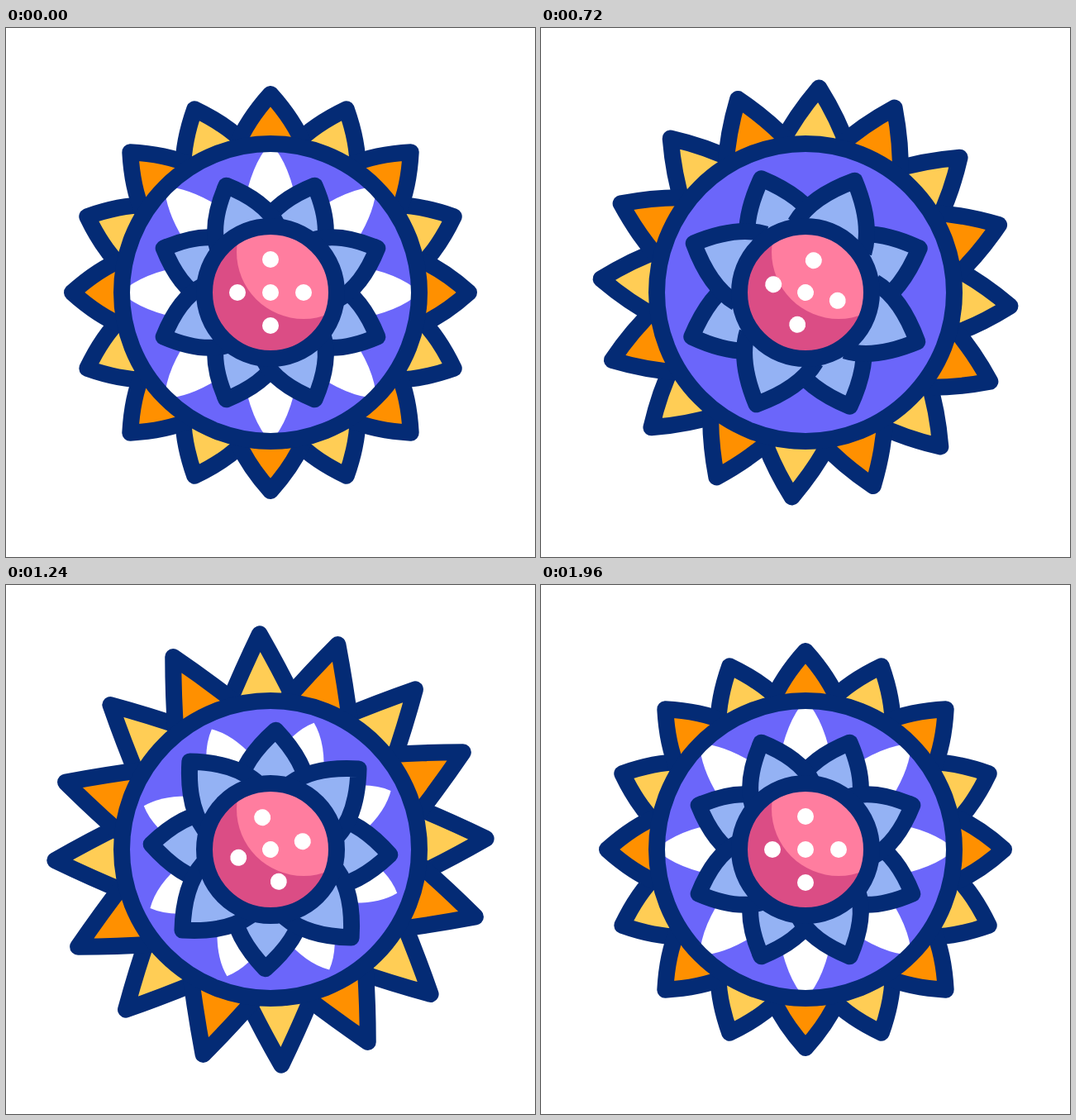
Recreate the animation shown at these times as an HTML page. Size 640 by 640 pixels, loop 2000 ms.

```html
<!DOCTYPE html>
<html lang="en">
<head>
<meta charset="utf-8">
<title>Mandala flower</title>
<style>
  html, body { margin: 0; width: 100%; height: 100%; overflow: hidden; background: #fff; }
  svg { display: block; width: 100%; height: 100%; }
  .line { stroke: #042b75; stroke-width: 20; stroke-linejoin: round; }
</style>
</head>
<body>
<svg viewBox="0 0 640 640">
  <defs>
    <clipPath id="core"><circle r="75"/></clipPath>
  </defs>
  <g transform="translate(320 320)">
    <g id="outer"></g>
    <circle r="180" fill="#6b66fa"/>
    <g id="white"></g>
    <circle class="line" r="180" fill="none"/>
    <g id="blue"></g>
    <circle r="75" fill="#db4d85"/>
    <circle cx="40" cy="-49" r="81" fill="#ff7d9f" clip-path="url(#core)"/>
    <circle class="line" r="80" fill="none"/>
    <g id="dots" fill="#fff"></g>
  </g>
</svg>
<script>
const LOOP = 2000, STEP = 40;
const $ = id => document.getElementById(id);

function add(parent, tag, attrs) {
  const el = document.createElementNS('http://www.w3.org/2000/svg', tag);
  for (const key in attrs) el.setAttribute(key, attrs[key]);
  return parent.appendChild(el);
}

function addPetals(parent, count, start, attrs) {
  return Array.from({ length: count }, (_, i) =>
    add(parent, 'path', { ...attrs, transform: `rotate(${start + i * 360 / count})` }));
}

const yellow = addPetals($('outer'), 8, 22.5, { class: 'line', fill: '#ffcd55' });
const orange = addPetals($('outer'), 8, 0, { class: 'line', fill: '#ff9000' });
const white = addPetals($('white'), 8, 0, { fill: '#fff' });
const blue = [22.5, 67.5].flatMap(start =>
  addPetals($('blue'), 4, start, { class: 'line', fill: '#94b2f4' }));

add($('dots'), 'circle', { r: 10 });
for (let i = 0; i < 4; i++) add($('dots'), 'circle', { r: 10, cy: -40, transform: `rotate(${i * 90})` });

// Smooth curve through [time, value] keys, flat at the ends and at turning points.
function curve(keys) {
  const slope = i => (keys[i + 1][1] - keys[i][1]) / (keys[i + 1][0] - keys[i][0]);
  const tangents = keys.map((_, i) => {
    if (i === 0 || i === keys.length - 1) return 0;
    const a = slope(i - 1), b = slope(i);
    return a * b <= 0 ? 0 : 2 * a * b / (a + b);
  });
  return t => {
    if (t <= keys[0][0]) return keys[0][1];
    const i = keys.findIndex((key, n) => n + 1 < keys.length && t < keys[n + 1][0]);
    if (i < 0) return keys[keys.length - 1][1];
    const [t0, v0] = keys[i], [t1, v1] = keys[i + 1];
    const span = t1 - t0, u = (t - t0) / span, w = 1 - u;
    return v0 * w * w * (1 + 2 * u) + v1 * u * u * (1 + 2 * w)
      + span * u * w * (tangents[i] * w - tangents[i + 1] * u);
  };
}

const outerGrow = curve([[80, 0], [360, 12.5], [520, 19], [600, 15.5], [890, 0.5],
  [1250, 21], [1480, 13.6], [1800, 2.5], [1960, 0]]);
const whiteShrink = curve([[80, 0], [360, 18], [640, 32], [880, 25], [1240, 19], [1480, 12], [1960, 0]]);
const blueGrow = curve([[80, 0], [360, 4], [600, 6.5], [840, 8.5], [1240, 4.5], [1480, 2.5], [1960, 0]]);
const blueTurn = curve([[80, 0], [360, -11.3], [600, -31], [880, -63], [1240, -110],
  [1480, -143.5], [1960, -180]]);

function turn(t) {
  const p = Math.min(1, Math.max(0, (t - 80) / 1800));
  return p * p * (3 - 2 * p);
}

// Two mirrored curved sides meeting at a tip; lean shifts the tip sideways.
function petal(tip, cx, cy, ex, ey, lean = 0) {
  const half = lean / 2;
  return `M${-ex} ${-ey}Q${half - cx} ${-cy} ${lean} ${-tip}Q${half + cx} ${-cy} ${ex} ${-ey}`;
}

const shape = (petals, d) => petals.forEach(el => el.setAttribute('d', d));
const rotate = (id, angle) => $(id).setAttribute('transform', `rotate(${angle})`);

function draw(t) {
  const grow = outerGrow(t), shrink = whiteShrink(t), swell = blueGrow(t), p = turn(t);
  const outer = lean => petal(240 + grow, 28.8 - grow * 0.28, 208 + grow * 0.45, 41, 177, lean);
  shape(orange, outer(-0.17 * grow));
  shape(yellow, outer(0.14 * grow));
  shape(white, petal(181 - shrink, 24 - shrink * 0.08, 155 - shrink * 0.62, 33, 100));
  shape(blue, petal(140 + swell, 36 + swell * 0.6, 105 + swell * 0.5, 39 + swell * 0.8, 72));
  rotate('outer', 90 * p);
  rotate('white', 90 * p);
  rotate('blue', blueTurn(t));
  rotate('dots', 360 * p);
}

const begin = performance.now();
function frame() {
  const t = (performance.now() - begin) % LOOP;
  draw(Math.floor(t / STEP) * STEP);
  requestAnimationFrame(frame);
}
draw(0);
requestAnimationFrame(frame);
</script>
</body>
</html>
```
